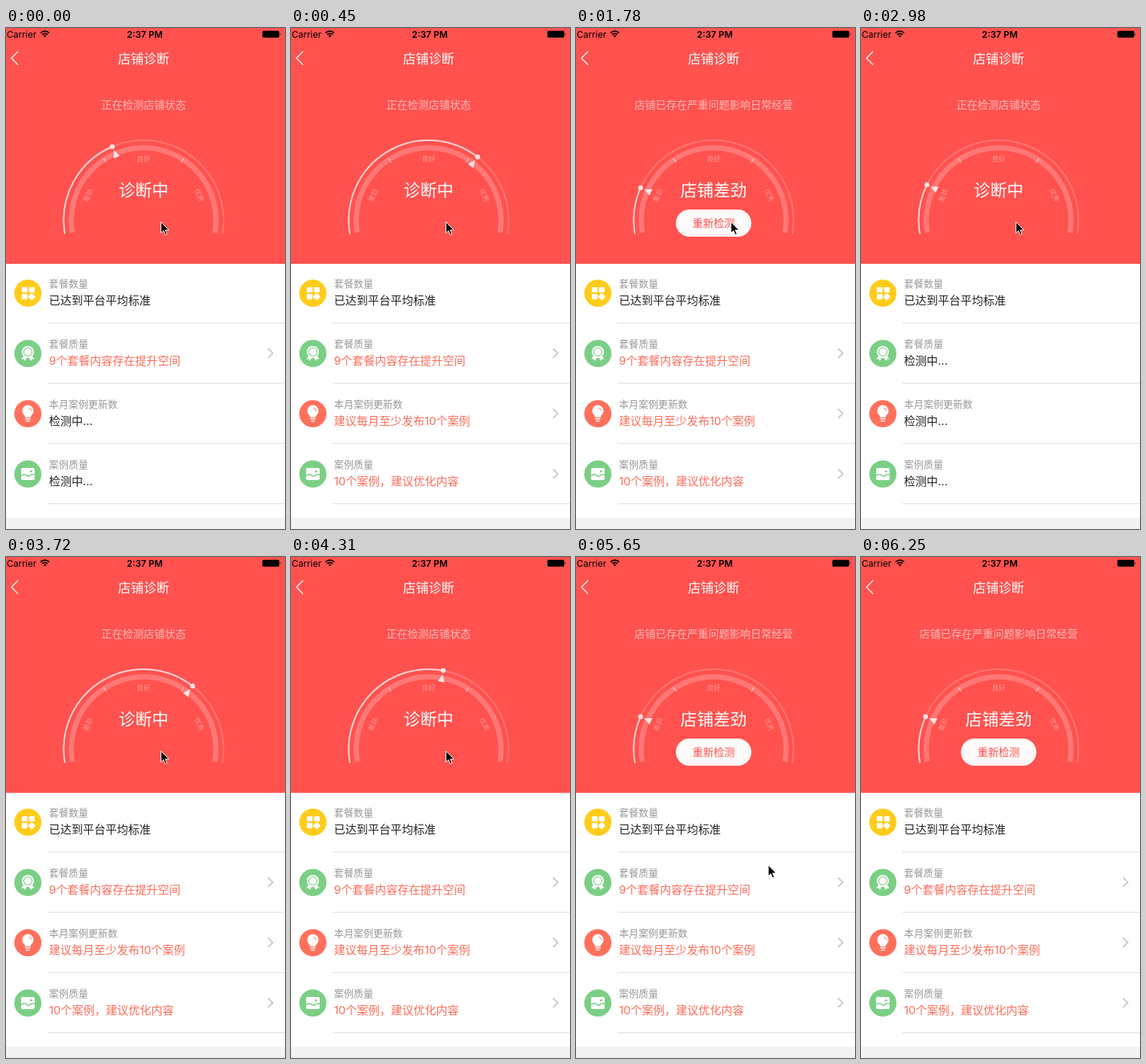
These frames come from a looping animation (370 by 665 pixels, 6.7 s). An HTML page:

```html
<!DOCTYPE html>
<html lang="zh-CN">
<head>
<meta charset="utf-8">
<title>店铺诊断</title>
<style>
  html, body { margin: 0; height: 100%; overflow: hidden; background: #fff; }
  svg { display: block; width: 100%; height: 100%; }
  text { font-family: Inter, "Noto Sans CJK SC", "Noto Sans CJK", sans-serif; fill: #fff; }
  .mid { text-anchor: middle; }
  .line { fill: none; stroke: #fff; }
</style>
</head>
<body>
<svg viewBox="0 0 370 665">
  <rect width="370" height="313" fill="#ff524f"/>
  <rect y="650" width="370" height="15" fill="#f2f2f2"/>

  <text x="1" y="12.7" font-size="12" style="fill:#000">Carrier</text>
  <text class="mid" x="184" y="12.7" font-size="12" font-weight="600" style="fill:#000">2:37 PM</text>
  <g fill="none" stroke="#000" stroke-width="1.7">
    <path d="M45.8 6.6a8 8 0 0 1 11.4 0M47.9 8.9a5 5 0 0 1 7.2 0"/>
    <path d="M51.5 12.4l-2-2a2.8 2.8 0 0 1 4 0z" fill="#000" stroke="none"/>
  </g>
  <rect x="340" y="3.7" width="22.3" height="9" rx="1.6"/>
  <path d="M363 6.5q1.8 1.7 0 3.4z"/>

  <path class="line" d="M16 31l-8.8 9 8.8 9" stroke-width="1.3"/>
  <text class="mid" x="182.5" y="46.6" font-size="17">店铺诊断</text>
  <text class="mid" id="status" x="182.5" y="107.2" font-size="14" fill-opacity=".6"></text>

  <path class="line" id="track" stroke-width="2" stroke-opacity=".2"/>
  <path class="line" id="band" stroke-width="7" stroke-opacity=".22"/>
  <path class="line" id="ticks" stroke-width="1.5" stroke-opacity=".45"/>
  <g id="marks" class="mid" font-size="9" fill-opacity=".4"></g>
  <path class="line" id="progress" stroke-width="2" stroke-opacity=".68"/>
  <circle id="dot" r="3.2" fill="#ffe4e3"/>
  <path id="needle" fill="#ffe4e3"/>
  <text class="mid" id="verdict" x="182.5" y="222.6" font-size="22"></text>
  <g id="button">
    <rect x="132.5" y="241" width="100" height="36" rx="18" fill="#fff"/>
    <rect x="134.5" y="242.5" width="95.5" height="31.5" rx="15.7" fill="#fffafa" stroke="#f6ebeb"/>
    <text class="mid" x="182.5" y="264.2" font-size="14" style="fill:#ff524f">重新检测</text>
  </g>

  <g id="rows"></g>

  <g id="icons" fill="#fff">
    <rect x="21" y="344" width="7.5" height="7" rx="1.3"/>
    <rect x="30.5" y="344" width="7.5" height="7" rx="1.3"/>
    <rect x="21" y="353" width="7.5" height="7.3" rx="1.3"/>
    <rect x="30.6" y="353.1" width="7.2" height="7.2" rx="1" transform="rotate(45 34.2 356.7)"/>

    <path d="M23.5 435l-3.2 4.6 3.2-.2 1.4 2.6 3-5zM34.5 435l3.2 4.6-3.2-.2-1.4 2.6-3-5z"/>
    <circle cx="29" cy="430" r="8"/>
    <circle cx="29" cy="430" r="5.5" fill="none" stroke="#7bcf85" stroke-width="1.2"/>

    <path d="M25.5 517q0-2-2-3.800a7.500 7.500 0 1 1 11 0q-2 1.800-2 3.800z"/>
    <path class="line" d="M25.500 518.800h7M26.500 521.700h5" stroke-width="1.400"/>
    <path d="M30 504.500q3.200.500 3.700 3.700" fill="none" stroke="#ff705c"/>

    <rect x="20" y="584" width="18" height="16" rx="1.8"/>
    <path d="M20 594.500q3.500-3.500 7-.8t5 .3 6-1" fill="none" stroke="#7bcf85" stroke-width="1.500"/>
    <circle cx="33.300" cy="588.500" r="1.500" fill="#7bcf85"/>
  </g>

  <path id="cursor" d="M0 0V14.600L3.300 11.500 5.700 17 8 16 5.700 10.700H10.500Z" stroke="#fff"/>
</svg>
<script>
const LOOP = 6700, TICK = 148.9, LEAD = 12;
const CX = 182.5, CY = 255, REST = 23.9;
const $ = id => document.getElementById(id);

// Angles run clockwise in degrees from the left horizontal.
const at = (deg, r) => {
  const a = deg * Math.PI / 180;
  return [CX - r * Math.cos(a), CY - r * Math.sin(a)].map(v => v.toFixed(2));
};
const arc = (from, to, r) =>
  `M${at(from, r)}A${r} ${r} 0 ${to - from > 180 ? 1 : 0} 1 ${at(to, r)}`;

$('track').setAttribute('d', arc(-10, 190, 106));
$('band').setAttribute('d', arc(-10, 190, 96));
$('ticks').setAttribute('d', [57, 123].map(a => `M${at(a, 91)}L${at(a, 98)}`).join(''));
$('marks').innerHTML = [['差劲', 24], ['良好', 90], ['优秀', 156]].map(([s, a]) =>
  `<text transform="translate(${at(a, 81)}) rotate(${a - 90})" y="3.4">${s}</text>`).join('');

const WAIT = '检测中...';
// label, result, icon colour, step at which the result appears
const rows = [
  ['套餐数量', '已达到平台平均标准', '#ffcc1c', 0],
  ['套餐质量', '9个套餐内容存在提升空间', '#7bcf85', 2],
  ['本月案例更新数', '建议每月至少发布10个案例', '#ff705c', 3],
  ['案例质量', '10个案例，建议优化内容', '#7bcf85', 4]
];
$('rows').innerHTML = rows.map(([label, , color], i) => `
  <g transform="translate(0 ${313 + 80 * i})">
    <circle cx="29" cy="39" r="18" fill="${color}"/>
    <text x="57" y="30.700" font-size="13" style="fill:#999">${label}</text>
    <text class="result" x="57" y="53.600" font-size="15"></text>
    <path class="chevron" d="M347.500 112.500l6.300 6.200-6.300 6.200" transform="translate(0 -80)"
      fill="none" stroke="#c8c8c8" stroke-width="1.800" transform-origin="0 0"/>
    <path d="M55 78.500H370" stroke="#e0e0e0"/>
  </g>`).join('');
const results = document.querySelectorAll('.result');
const chevrons = document.querySelectorAll('.chevron');
chevrons.forEach(c => c.setAttribute('transform', 'translate(0 0)'));
chevrons.forEach(c => c.setAttribute('d', 'M347.5 112.5l6.3 6.2-6.3 6.2'));

function drawGauge(a) {
  $('progress').setAttribute('d', arc(-10, a, 106));
  const [x, y] = at(a, 106);
  $('dot').setAttribute('cx', x);
  $('dot').setAttribute('cy', y);
  $('needle').setAttribute('d', `M${at(a, 101)}L${at(a - 2.8, 91)}L${at(a + 2.8, 91)}Z`);
}

function drawCursor(k) {
  const [x, y] = k < 38 ? [205.5, 257.5] : k < 39 ? [255, 409] : k < 41 ? [305.5, 560.5] : [322.5, 619.5];
  $('cursor').setAttribute('transform', `translate(${x} ${y})`);
  $('cursor').style.display = k < 42 ? '' : 'none';
}

function draw(t) {
  const k = Math.floor((t + LEAD) / TICK) % 45;
  const step = k < 20 ? k + 2 : k - 20;   // steps since the check began
  const done = step >= 14;

  drawGauge(Math.max(REST, Math.min(26.3 + 20.3 * step, 271.6 - 19 * step)));
  drawCursor(k);
  $('status').textContent = done ? '店铺已存在严重问题影响日常经营' : '正在检测店铺状态';
  $('verdict').textContent = done ? '店铺差劲' : '诊断中';
  $('button').style.display = done ? '' : 'none';

  rows.forEach(([, result, , since], i) => {
    const ready = step >= since, warn = ready && i > 0;
    results[i].textContent = ready ? result : WAIT;
    results[i].style.fill = warn ? '#ff6c5a' : '#222';
    chevrons[i].setAttribute('transform', 'translate(0 0)');
    chevrons[i].setAttribute('d', 'M347.5 32.5l6.3 6.2-6.3 6.2');
    chevrons[i].style.display = warn ? '' : 'none';
  });
}

const start = performance.now();
function loop() {
  draw((performance.now() - start) % LOOP);
  requestAnimationFrame(loop);
}
loop();
</script>
</body>
</html>
```
